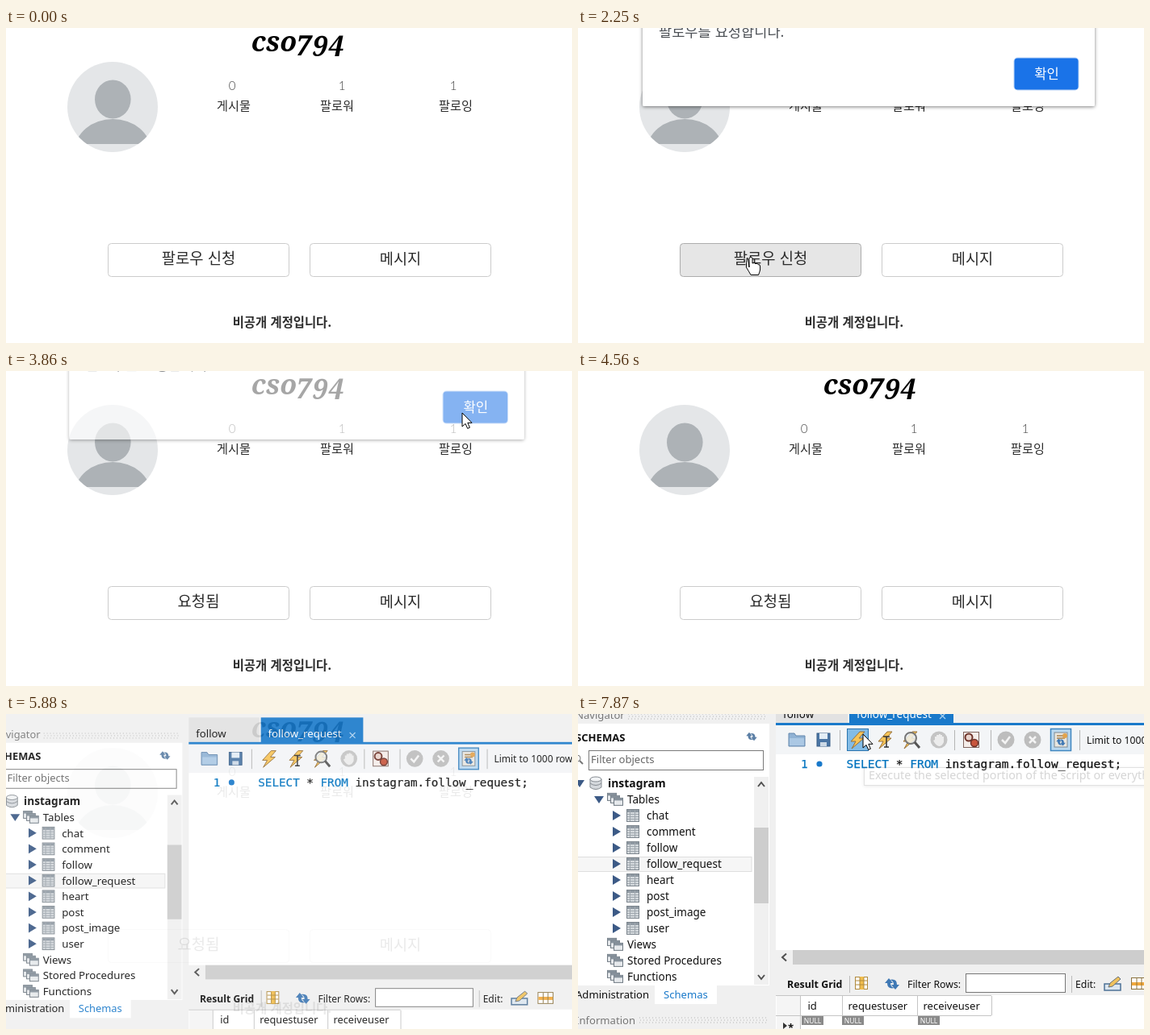
An HTML page that plays this animation: 701 by 391 pixels, repeating every 8000 ms.

```html
<!DOCTYPE html>
<html lang="ko">
<head>
<meta charset="utf-8">
<title>Follow request</title>
<style>
html, body { margin: 0; width: 100%; height: 100%; overflow: hidden; background: #fff; }
svg { display: block; width: 701px; height: 391px; }
text { white-space: pre; }
.ko { font-family: "Noto Sans CJK KR", "Noto Sans CJK", sans-serif; text-anchor: middle; fill: #2c2c2c; }
.ui { font: 13.1px "Noto Sans", "Open Sans", sans-serif; fill: #111; }
.tree { font-size: 13.5px; }
.code { font: 14.52px "DejaVu Sans Mono", monospace; fill: #111; stroke: #111; stroke-width: .25px; }
.key { fill: #0073bf; stroke: #0073bf; }
.bold { font-weight: 700; }
.brand { font: italic 900 34px "Noto Serif", serif; font-feature-settings: "onum"; text-anchor: middle; }
</style>
</head>
<body>
<svg id="stage" viewBox="0 0 701 391">
  <defs>
    <filter id="shadow" x="-5%" y="-20%" width="110%" height="150%">
      <feDropShadow dx="0" dy="1" stdDeviation="2" flood-opacity=".5"/>
    </filter>
    <clipPath id="bust"><path d="M76 42H188V144H76z"/></clipPath>
    <clipPath id="disc"><circle cx="132" cy="98" r="56"/></clipPath>
  </defs>
  <g id="page"></g>
  <g id="dialog"></g>
  <g id="bench"></g>
  <circle id="flash" r="15" fill="#f0ec3c" opacity=".72"/>
  <g id="cursor">
    <path id="arrow" d="M0 0V17L4 13.4L6.7 19.4L9.4 18.2L6.8 12.3H12z" fill="#fff" stroke="#000"/>
    <path id="hand" d="M-2 1.5Q0-1 2 1.5V8Q4 6.5 6 8.6Q8 7.4 9.2 9.6Q11.5 9 11.6 12V16Q11 19 9.5 22.5H0Q-3 17-5.6 13Q-5-10.6-2 13z" fill="#fff" stroke="#000"/>
    <path id="resize" d="M-1.5-6.5V5.5M1.5-6.5V5.5M-7.5-.5H-2M2-.5H7.5M-5-2.5L-7.5-.5L-5 1.5M5-2.5L7.5-.5L5 1.5" fill="none" stroke="#000"/>
  </g>
</svg>
<script>
const $ = id => document.getElementById(id);
const LOOP = 8000;

const text = (x, y, str, cls = 'ui', more = '') => `<text x="${x}" y="${y}" class="${cls}" ${more}>${str}</text>`;
const rect = (x, y, w, h, fill, more = '') => `<rect x="${x}" y="${y}" width="${w}" height="${h}" fill="${fill}" ${more}/>`;
const line = (d, color = '#bbb', width = 1) => `<path d="${d}" fill="none" stroke="${color}" stroke-width="${width}"/>`;
const shape = (d, fill, more = '') => `<path d="${d}" fill="${fill}" ${more}/>`;
const at = (x, y, body) => `<g transform="translate(${x} ${y})">${body}</g>`;
const ko = (x, y, str, size, weight = 300, more = '') =>
  text(x, y, str, 'ko', `font-size="${size}" font-weight="${weight}" ${more}`);

// Profile page
const stats = [[280, 282, '0', '게시물'], [416, 410, '1', '팔로워'], [554, 557, '1', '팔로잉']];
$('page').innerHTML =
  rect(0, 0, 701, 391, '#fff') +
  text(362, 29, 'cso794', 'brand') +
  '<circle cx="132" cy="98" r="56" fill="#e4e6e8"/>' +
  '<g clip-path="url(#disc)" fill="#adb2b6"><ellipse cx="132.3" cy="88.5" rx="22.3" ry="24"/>' +
  '<ellipse cx="132.3" cy="152" rx="47" ry="39" clip-path="url(#bust)"/></g>' +
  stats.map(([nx, lx, n, label]) =>
    text(nx, 77, n, 'ui', 'text-anchor="middle" style="font:300 15px Lato,sans-serif;fill:#444"') +
    ko(lx, 102, label, 15.2)).join('') +
  rect(126.5, 267.5, 224, 41, '#fff', 'id="follow" rx="4" stroke="#ccc"') +
  rect(376.5, 267.5, 224, 41, '#fff', 'rx="4" stroke="#ccc"') +
  ko(238.5, 293, '팔로우 신청', 18.8, 300, 'id="followLabel"') +
  ko(488.5, 293, '메시지', 18.6) +
  ko(342, 371, '비공개 계정입니다.', 15.4, 700);

$('dialog').innerHTML =
  rect(80, -60, 560, 157, '#fff', 'rx="2" filter="url(#shadow)"') +
  ko(100, 10.5, '팔로우를 요청합니다.', 17.6, 300, 'style="text-anchor:start;fill:#4c5055"') +
  rect(539.5, 36.5, 81, 41, '#b9d4f8', 'rx="5"') +
  rect(540.5, 37.5, 79, 39, '#1a73e8', 'id="ok" rx="4"') +
  ko(580.5, 62.5, '확인', 16.6, 400, 'style="fill:#fff"');

// Database window
const dots = (x, y, w) => [0, 3, 6].map(d =>
  `<path d="M${x + d % 2} ${y + d}H${x + w}" stroke="#b4b4b4" stroke-dasharray="1 3"/>`).join('');
const tri = (x, y, open) => at(x, y, shape(open ? 'M-6-4H6L0 5z' : 'M-4-6V6L6 0z', '#3c5a86'));
const table = (x, y) => at(x, y, rect(-7.5, -7.5, 15, 15, '#d3d8dc', 'stroke="#7d868e"') +
  rect(-7, -7, 14, 3, '#8f99a2') + line('M-7-1.5H7M-7 1.5H7M-7 4.5H7M-3.5-7V7M2.5-7V7', '#9fa7ae'));
const stack = (x, y) => at(x, y, [-9.5, -5.5, -1.5].map(d =>
  rect(d, d * .75 - 1.5, 11, 9, '#e6e9ec', 'stroke="#6f7982"') + rect(d, d * .75 - 1.5, 11, 3, '#87929c')).join(''));
const bolt = (x, y) => at(x, y, shape('M3-10L-8 2H-2L-7 11L8-2H2L9-10z', '#f8c456', 'stroke="#96703a"'));
const sync = (x, y, s = 1, color = '#3f78b4') => at(x, y, `<g transform="scale(${s})">` +
  shape('M-9-1L-4-7L1-1H-2Q-2 4 3 5Q-6 7-6-1zM9 1L4 7L-1 1H2Q2-4-3-5Q6-7 6 1z', color) + '</g>');
const disk = (x, y, d) => at(x, y, '<circle r="10.5" fill="#bdbdbd"/>' + line(d, '#f4f4f4', 2.5));
const slot = (x, id) => rect(x, 18.5, 26, 27, 'none', `id="${id}"`);
const pencil = (x, y) => at(x, y, rect(-10, 0, 20, 8, '#dce6ef', 'stroke="#4d7196" stroke-width="1.5"') +
  shape('M-5 4L-3-1L7-9L10-6L0 3z', '#f0c15b', 'stroke="#65707b"'));

const tables = ['chat', 'comment', 'follow', 'follow_request', 'heart', 'post', 'post_image', 'user'];
const groups = ['Views', 'Stored Procedures', 'Functions'];
const key = str => `<tspan class="key">${str}</tspan>`;

const sidebar =
  text(-3, 6, 'Navigator', 'ui', 'style="fill:#777"') + dots(62, 0, 172) +
  rect(-40, 12, 277, 325, '#fff') +
  text(-3, 33.5, 'SCHEMAS', 'ui bold') + sync(215, 28, .75, '#5b7fa5') +
  '<circle cx="-1" cy="55" r="4" fill="none" stroke="#777"/>' + line('M2 58L6 62', '#777', 2) +
  rect(13.5, 45.5, 216, 24, '#fff', 'stroke="#7a7a7a"') +
  text(16, 61, 'Filter objects', 'ui', 'style="fill:#666"') +
  tri(2, 86, true) +
  at(22, 86, shape('M-7-5V5Q0 10 7 5V-5z', '#d5d9dd', 'stroke="#858b91"') +
    '<ellipse cy="-5" rx="7" ry="3" fill="#f1f3f5" stroke="#858b91"/>' + line('M-7 0Q0 5 7 0', '#858b91')) +
  text(37, 91, 'instagram', 'ui bold', 'style="font-size:13.9px"') +
  tri(26, 106, true) + stack(46, 107) + text(61, 111, 'Tables', 'ui tree') +
  rect(-2, 177.5, 217, 18, '#f6f6f6', 'stroke="#dedede"') +
  tables.map((name, i) => tri(47, 126 + i * 20) + table(68, 126 + i * 20) + text(85, 131 + i * 20, name, 'ui tree')).join('') +
  groups.map((name, i) => stack(46, 287 + i * 20) + text(61, 291 + i * 20, name, 'ui tree')).join('') +
  rect(218, 78, 18, 258, '#f0f0f0') + rect(218, 141, 18, 94, '#cdcdcd') +
  line('M223 90L227 85L231 90M223 324L227 329L231 324', '#505050', 2) +
  rect(95, 336, 77, 24, '#fff') +
  text(-3, 352.5, 'Administration') + text(106, 352.5, 'Schemas', 'ui', 'style="fill:#1979ca"') +
  text(-3, 385, 'Information', 'ui', 'style="fill:#777"') + dots(76, 377, 160);

const toolbar =
  rect(245, -20, 89, 31, '#e2e2e2') + text(254, 5, 'follow', 'ui tree') +
  rect(336, -20, 129, 32, '#1979ca') + text(345, 5, 'follow_request', 'ui tree', 'style="fill:#fff"') +
  line('M448-1L455 6M455-1L448 6', '#a9d0f0', 1.3) +
  rect(245, 11, 900, 3, '#1979ca') + rect(245, 14, 900, 36, '#f3f5f7') +
  at(271, 32, shape('M-10 8V-8H-3L-1-5H10V8z', '#90b2d4', 'stroke="#6488ae"') + rect(-9, -2, 18, 9, '#abc8e4')) +
  at(304, 32, rect(-8, -8, 16, 16, '#4b76a5', 'stroke="#365c86"') + rect(-5, -8, 10, 7, '#e3edf6') + rect(-4, 3, 8, 5, '#ccd9e6')) +
  line('M324.5 20V45M466.5 20V45M511.5 20V45M621.5 20V45', '#b5b5b5') +
  slot(333.5, 'run') + slot(367.5, 'runOne') + slot(401.5, 'explain') +
  bolt(346, 32) + bolt(380, 32) + line('M378 28H386M382 28V41M379 41H385', '#333', 1.5) +
  at(413, 32, bolt(-2, 0) + '<circle cx="-1" cy="-2" r="7" fill="#eef4f8" fill-opacity=".8" stroke="#777" stroke-width="2"/>' + line('M4 3L10 10', '#555', 3)) +
  at(447, 32, '<circle r="10.5" fill="#c4c4c4"/>' + shape('M-5 0V-4H-3V-6H0V-7H2V-6H4V-4H6V3Q4 8 0 8Q-4 7-7 1z', '#ececec')) +
  at(487, 32, rect(-9.5, -9.5, 19, 19, '#f5ede9', 'stroke="#81665f"') +
    '<circle cx="-3" cy="-3" r="4.5" fill="#e9d3cc" stroke="#6e3329" stroke-width="2"/>' +
    '<circle cx="4" cy="4" r="4.5" fill="#c8553c" stroke="#6e3329" stroke-width="1.5"/>') +
  disk(530, 32, 'M-5 0L-1 4L5-4') + disk(563, 32, 'M-4-4L4 4M4-4L-4 4') +
  rect(585.5, 18.5, 25, 27, '#b9d8f0', 'stroke="#3f86c0" stroke-width="1.5"') +
  at(598, 32, rect(-8, -9, 16, 18, '#e9e6df', 'stroke="#7f8a94"') + line('M-5-5H3M-5-2H5', '#a8834f', 1.5) +
    sync(0, 3, .65) + '<circle cx="5" cy="-5" r="3" fill="#e3a34c"/>') +
  text(630, 36.5, 'Limit to 1000 rows', 'ui', 'style="font-size:12.2px"');

const editor =
  rect(245, 50, 900, 243, '#fff') +
  text(276, 67, '1', 'code key') + '<circle cx="299" cy="62" r="3.6" fill="#1979ca"/>' +
  text(332.5, 67, key('SELECT') + ' * ' + key('FROM') + ' instagram.follow_request;', 'code') +
  rect(266, 293, 900, 18, '#cdcdcd') + line('M258 297.5L253 302L258 306.5', '#505050', 2);

const badge = x => rect(x, 375, 27, 11, '#8a8a8a') +
  text(x + 13.5, 384, 'NULL', 'ui', 'text-anchor="middle" style="font-size:8.5px;fill:#fff"');
const results =
  text(259, 340, 'Result Grid', 'ui bold', 'style="font-size:12.4px"') + line('M336.5 325V346M611.5 325V346') +
  at(351, 334, rect(-7.5, -7.5, 15, 15, '#fff', 'stroke="#b08a3d"') + rect(-2, -8, 5, 16, '#f1bd4d') + line('M-7-3H7M-7 2H7M-2-7V7M3-7V7', '#b08a3d')) +
  sync(389, 335) + text(408, 340, 'Filter Rows:', 'ui', 'style="font-size:12.3px"') +
  rect(480.5, 322.5, 123, 23, '#fff', 'stroke="#777"') +
  text(616, 340, 'Edit:', 'ui', 'style="font-size:12.3px"') + pencil(662, 335) +
  at(695, 335, rect(-9.5, -7.5, 19, 14, '#fff', 'stroke="#8c7440"') + rect(-9, -2, 18, 4, '#f1a93d') + line('M-3-7V6M3-7V6', '#8c7440')) +
  rect(245, 349, 900, 50, '#fff') + rect(246, 350, 29, 45, '#f5f5f5') +
  line('M245 349.5H512M245 374.5H512M275.5 350V391M327.5 350V374M420.5 350V374M512.5 350V374', '#c5c5c5') +
  text(284.5, 367, 'id', 'ui', 'style="font-size:13px"') +
  text(334.5, 367, 'requestuser', 'ui', 'style="font-size:13px"') +
  text(427.5, 367, 'receiveuser', 'ui', 'style="font-size:13px"') +
  [277, 327, 421].map(badge).join('') +
  shape('M254 383V391L259 387z', '#333') + text(260, 394, '*', 'ui bold');

$('bench').innerHTML =
  rect(-300, -136, 1300, 700, '#f0f0f0') + rect(-300, -136, 1300, 40, '#fff') +
  line('M-300-136H1000', '#ccc') + line('M150-72H1000', '#aaa') +
  text(152, -113, 'MySQL Workbench', 'ui', 'text-anchor="end"') +
  text(206, -79, 'Local instance MySQL80', 'ui', 'text-anchor="end"') + line('M218-88L226-80M226-88L218-80', '#555', 1.3) +
  rect(-20, 45.5, 249, 24, 'none', 'stroke="#7a7a7a"') +
  `<g id="benchBody">${sidebar}${toolbar}${editor}${results}` +
  '<g id="tip">' + rect(354.5, 66.5, 380, 22, '#fff', 'stroke="#555" filter="url(#shadow)"') +
  text(360, 81, 'Execute the selected portion of the script or everything', 'ui', 'style="font-size:14.3px"') + '</g></g>';

// Pointer legs: start, stop, step count, lead step, way points
const legs = [
  [1090, 1700, 9, 0, [[238, 384], [214, 284]]],
  [2500, 3280, 13, 1, [[214, 284], [565, 54]]],
  [3350, 3420, 2, 1, [[565, 54], [565, 52]]],
  [4160, 4500, 6, 1, [[565, 52], [101, 337]]],
  [7050, 7640, 10, 0, [[243, 323], [330, 150], [412, 40], [380, 28], [353, 25]]]
];
const clicks = [[1740, 1880], [3660, 3790], [7820, 7870]];
const dialogSteps = [[1930, .3], [1990, .65], [2060, .9], [2130, 1], [3790, .9], [3860, .65], [3920, .3], [3980, 0]];
const benchSteps = [[5740, 1, .2], [5800, .5, .55], [5870, .15, .9], [5930, 0, 1]];

const latest = (steps, t) => steps.filter(s => s[0] <= t).pop();
const during = (t, [a, b]) => t >= a && t < b;
const inside = (p, x, y, w, h) => p && p[0] >= x && p[0] < x + w && p[1] >= y && p[1] < y + h;

function pointer(t) {
  const leg = latest(legs, t);
  if (!leg || during(t, [4560, 7050])) return null;
  const [start, stop, n, lead, pts] = leg;
  const u = Math.min(1, (t - start) / (stop - start));
  const k = (Math.floor(u * (n - 1) + 1e-6) + lead) / (n - 1 + lead);
  const s = k * k * (3 - 2 * k) * (pts.length - 1);
  const i = Math.min(Math.floor(s), pts.length - 2);
  return pts[i].map((v, axis) => v + (pts[i + 1][axis] - v) * (s - i));
}

const show = (id, on) => $(id).style.display = on ? '' : 'none';
const paint = (id, fill, stroke) => { $(id).setAttribute('fill', fill); $(id).setAttribute('stroke', stroke); };

function render(t) {
  const p = pointer(t);
  const inBench = t >= 5740;
  const modal = during(t, [1930, 3790]);
  const overFollow = !inBench && (modal || inside(p, 126, 267, 225, 42));

  paint('follow', overFollow ? '#e6e6e6' : '#fff', overFollow ? '#adadad' : '#ccc');
  const label = t < 3790 ? '팔로우 신청' : '요청됨';
  if ($('followLabel').textContent !== label) $('followLabel').textContent = label;

  const alpha = (latest(dialogSteps, t) || [0, 0])[1], gone = 1 - alpha;
  show('dialog', alpha > 0);
  $('dialog').setAttribute('opacity', alpha);
  $('dialog').setAttribute('transform', `translate(360 ${-34 * gone}) scale(${1 + .017 * gone} 1) translate(-360 0)`);
  $('ok').setAttribute('fill', inside(p, 540, 37, 80, 40) ? '#448bec' : '#1a73e8');

  const bench = latest(benchSteps, t);
  show('bench', bench);
  if (bench) {
    const [, away, opacity] = bench;
    $('bench').setAttribute('opacity', opacity);
    $('bench').setAttribute('transform', `translate(${-95 * away} ${160 * away}) scale(${1 - .12 * away})`);
    show('benchBody', away < 1);
  }
  for (const [id, x] of [['run', 333], ['runOne', 367], ['explain', 401]]) {
    const over = inside(p, x, 18, 27, 28);
    paint(id, over ? '#83bce6' : 'none', over ? '#2a74b0' : 'none');
  }
  show('tip', t >= 7820);
  $('tip').setAttribute('opacity', t < 7870 ? .07 : .17);

  show('cursor', p);
  show('flash', p && clicks.some(c => during(t, c)));
  if (!p) return;
  const kind = inBench ? (p[1] > 300 ? 'resize' : 'arrow')
    : (modal ? t < 2500 : overFollow) ? 'hand' : 'arrow';
  for (const id of ['arrow', 'hand', 'resize']) show(id, id === kind);
  $('cursor').setAttribute('transform', `translate(${p})`);
  $('flash').setAttribute('transform', `translate(${p})`);
}

function tick() {
  render(performance.now() % LOOP);
  requestAnimationFrame(tick);
}
tick();
</script>
</body>
</html>
```
